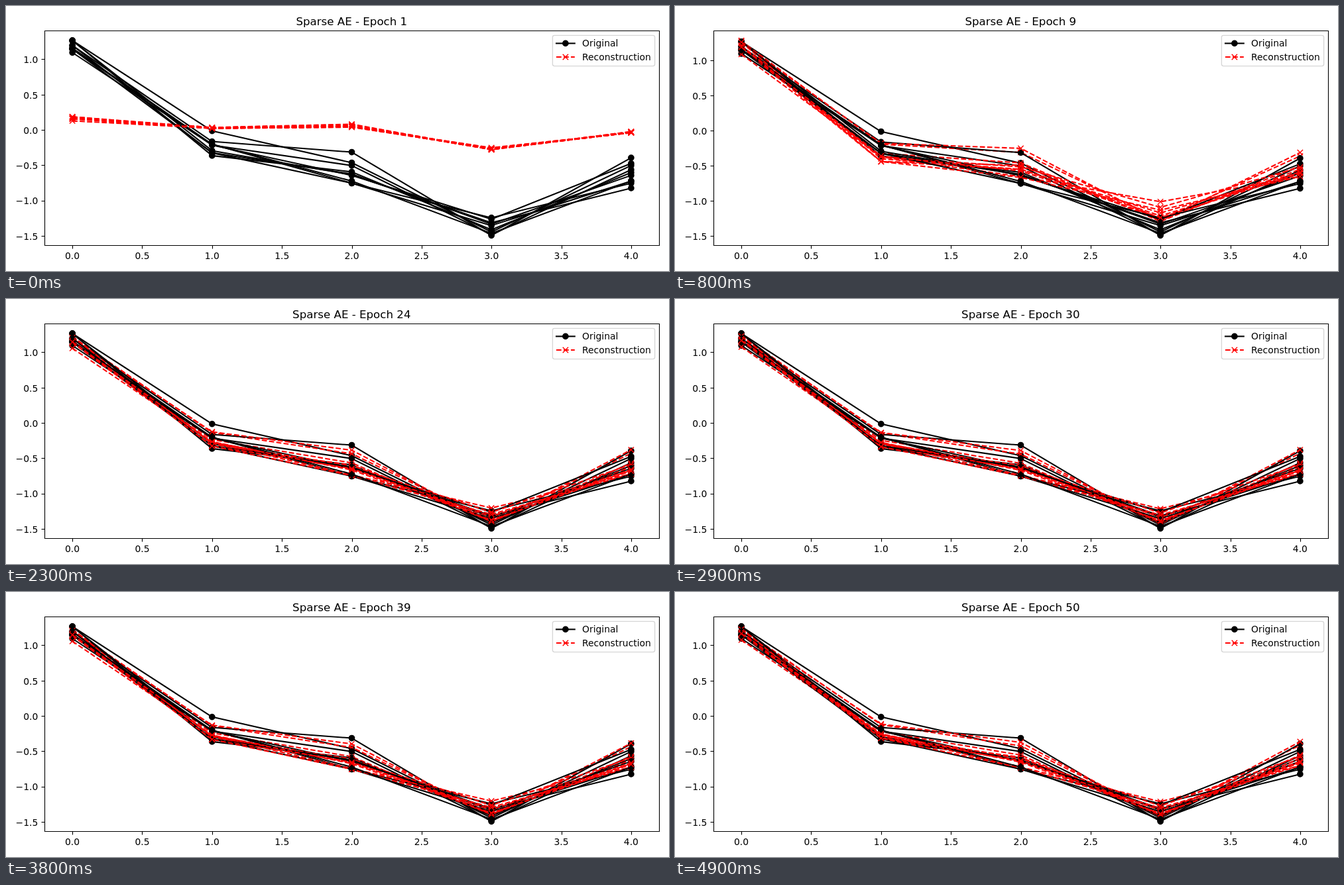
An HTML page for the animation above (5000 ms loop, 1000 by 400 pixels).

```html
<!DOCTYPE html>
<html lang="en">
<head>
<meta charset="utf-8">
<title>Sparse AE</title>
<style>
  html, body { margin: 0; width: 100%; height: 100%; overflow: hidden; background: #fff; }
  svg { display: block; width: 1000px; height: 400px; font: 13.89px "DejaVu Sans", sans-serif; }
  path { fill: none; stroke-linejoin: round; }
  .axis { stroke: #000; stroke-width: 1.11; }
  .black { stroke: #000; stroke-width: 2.08; stroke-linecap: square; }
  .dot { fill: #000; stroke: none; }
  .red { stroke: #f00; stroke-width: 2.08; stroke-dasharray: 7.71 3.33; }
  .cross { stroke: #f00; stroke-width: 1.39; }
  .mid { text-anchor: middle; }
  .end { text-anchor: end; }
  #title { font-size: 16.67px; }
  #legend rect { fill: #fff; fill-opacity: .8; stroke: #ccc; stroke-opacity: .8; stroke-width: 1.39; }
</style>
</head>
<body>
<svg viewBox="0 0 1000 400">
  <g id="series"></g>
  <g id="yaxis"></g>
  <g id="xaxis"></g>
  <path class="axis" d="M58.5 37.5H985.5V361.5H58.5Z"/>
  <text id="title" class="mid" x="521.3" y="29"></text>
  <g id="legend">
    <rect x="824.4" y="44.4" width="154.2" height="46.2" rx="2.8"/>
    <text x="869" y="61.3">Original</text>
    <text x="869" y="82">Reconstruction</text>
  </g>
</svg>
<script>
const EPOCHS = 50, STEP = 100;
const TOP = 37.5, BOTTOM = 361, LEFT = 58, WIDTH = 927;
const byId = id => document.getElementById(id);

// Hundredths, one row per sample
const original = [
  [127, -1, -46, -144, -50], [120, -16, -31, -149, -39],
  [116, -21, -50, -148, -56], [127, -29, -63, -131, -82],
  [127, -36, -59, -141, -60], [115, -20, -75, -124, -75],
  [110, -21, -64, -126, -47], [120, -32, -62, -133, -64],
  [115, -32, -75, -135, -72], [116, -20, -72, -146, -72]
];
const learned = [
  [124, -12, -42, -140, -41], [122, -11, -37, -142, -36],
  [118, -22, -55, -142, -55], [125, -28, -63, -136, -65],
  [123, -31, -58, -140, -60], [116, -26, -72, -121, -70],
  [108, -26, -60, -127, -57], [119, -31, -63, -133, -64],
  [116, -31, -73, -130, -70], [117, -25, -65, -138, -66]
];
const center = learned[0].map((_, k) => learned.reduce((sum, row) => sum + row[k], 0) / learned.length);

// Mean and spread of the reconstruction for each feature
const keys = [
  { at: 1, mean: [17, 3, 6, -26.5, -3], spread: [.35, .07, .12, .13, .05] },
  { at: 9, mean: [121.5, -35, -50, -119.5, -53.3], spread: [1.15, 1.3, 1.15, 1.33, 1] },
  { at: 17, mean: [117.8, -25, -62, -133.5, -58], spread: [1, 1.12, .92, 1.2, .9] },
  { at: 24, mean: [117, -25.5, -60, -134, -60] },
  { at: 30, mean: [119, -26.5, -60.5, -135, -60] },
  { at: 39, mean: [117, -26, -61, -134, -60.5] },
  { at: 43, mean: [121.3, -25.2, -60, -134.5, -59.5] },
  { at: 50, mean: center }
];

const mix = (a, b, p) => a + (b - a) * p;
const spreadOf = (key, k) => key.spread ? key.spread[k] : 1;

function reconstruct(epoch) {
  const n = Math.max(1, keys.findIndex(key => key.at >= epoch));
  const a = keys[n - 1], b = keys[n];
  const u = (epoch - a.at) / (b.at - a.at);
  const p = n === 1 ? Math.sin(Math.PI / 2 * Math.min(1, 1.4 * u)) : (1 - Math.cos(Math.PI * u)) / 2;
  return learned.map(row => row.map((v, k) =>
    mix(a.mean[k], b.mean[k], p) + (v - center[k]) * mix(spreadOf(a, k), spreadOf(b, k), p)));
}

const xAt = v => LEFT + WIDTH * (1 / 22 + v / 4.4);
const snap = v => Math.round(v) + .5;
const label = v => v.toFixed(1).replace("-", "\u2212");
const path = (cls, d) => `<path class="${cls}" d="${d}"/>`;
const line = pts => "M" + pts.map(p => p.map(v => v.toFixed(2)).join(" ")).join("L");
const dot = ([x, y]) => `M${x - 4.86} ${y}a4.86 4.86 0 1 0 9.72 0a4.86 4.86 0 1 0 -9.72 0Z`;
const cross = ([x, y]) => `M${x - 4.17} ${y - 4.17}l8.34 8.34m0 -8.34l-8.34 8.34`;
const solid = (pts, marks = pts) => path("black", line(pts)) + path("dot", marks.map(dot).join(""));
const dashed = (pts, marks = pts) => path("red", line(pts)) + path("cross", marks.map(cross).join(""));

function draw(epoch) {
  const recon = reconstruct(epoch);
  const all = [...original, ...recon].flat();
  const low = Math.min(...all), high = Math.max(...all);
  const yAt = v => BOTTOM - (BOTTOM - TOP) * (1 / 22 + (v - low) / (high - low) / 1.1);
  const points = row => row.map((v, k) => [xAt(k), yAt(v)]);

  byId("series").innerHTML = original.map((row, i) => solid(points(row)) + dashed(points(recon[i]))).join("");
  let ticks = "";
  for (let v = -1.5; v <= 1; v += .5) {
    const y = yAt(v * 100);
    ticks += path("axis", `M53.5 ${snap(y - .5)}H58.5`) +
      `<text class="end" x="48.3" y="${(y + 5.2).toFixed(1)}">${label(v)}</text>`;
  }
  byId("yaxis").innerHTML = ticks;
  byId("title").textContent = "Sparse AE - Epoch " + epoch;
}

let xTicks = "";
for (let v = 0; v <= 4; v += .5) {
  xTicks += path("axis", `M${snap(xAt(v))} 361.5V366.5`) +
    `<text class="mid" x="${xAt(v).toFixed(1)}" y="382">${label(v)}</text>`;
}
byId("xaxis").innerHTML = xTicks;
byId("legend").insertAdjacentHTML("beforeend",
  solid([[830, 56.4], [857.8, 56.4]], [[843.9, 56.4]]) +
  dashed([[830, 77], [857.8, 77]], [[843.9, 77]]));

let shown = 0;
const start = performance.now();
function tick() {
  const epoch = Math.floor(Math.max(0, performance.now() - start) / STEP) % EPOCHS + 1;
  if (epoch !== shown) draw(shown = epoch);
  requestAnimationFrame(tick);
}
tick();
</script>
</body>
</html>
```
